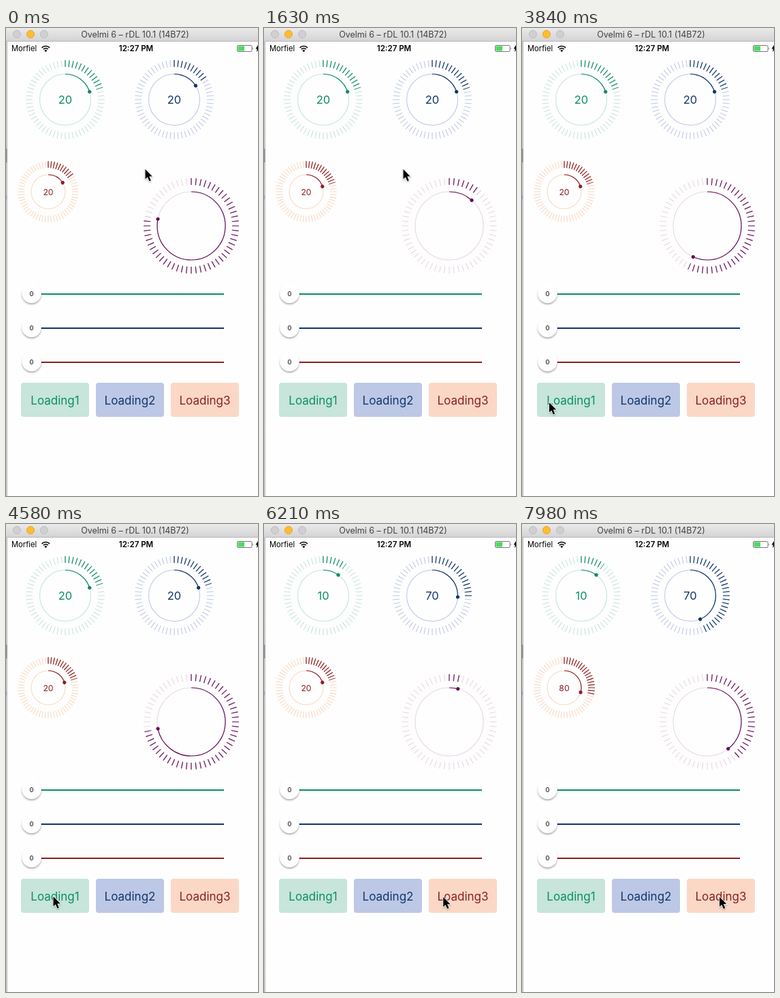
Write an HTML page that moves like this. It is 370 px wide and 686 px high and loops after 8000 ms.

```html
<!DOCTYPE html>
<html lang="en">
<head>
<meta charset="utf-8">
<title>Circular progress</title>
<style>
  html, body { margin: 0; width: 100%; height: 100%; overflow: hidden; background: #fff; }
  svg { display: block; width: 370px; height: 686px; font-family: Inter, Roboto, sans-serif; }
  text { text-anchor: middle; }
  .knob { fill: #fff; filter: drop-shadow(0 2.6px 1.2px rgba(0, 0, 0, .3)); }
</style>
</head>
<body>
<svg id="stage" viewBox="0 0 370 686">
  <defs>
    <linearGradient id="bar" x2="0" y2="1">
      <stop stop-color="#ebeaeb"/><stop offset="1" stop-color="#d3d2d4"/>
    </linearGradient>
    <linearGradient id="edge">
      <stop stop-color="#dedede"/><stop offset="1" stop-color="#a9a9a9"/>
    </linearGradient>
  </defs>
  <rect width="370" height="686" fill="#fefefe"/>
  <rect y="19" width="2" height="667" fill="url(#edge)"/>
  <rect y="177" width="2" height="20" fill="#98989c"/>
  <rect y="245" width="1.5" height="6" fill="#a3aee0"/>
  <rect width="370" height="19.5" fill="url(#bar)"/>
  <rect y="19" width="370" height="1" fill="#b9b8ba"/>
  <g fill="#d0cfd1" stroke="#bdbcbe">
    <circle cx="16" cy="9" r="5.5"/>
    <circle cx="36" cy="9" r="5.5" fill="#fdbd2f" stroke="#e5a52b"/>
    <circle cx="56" cy="9" r="5.5"/>
  </g>
  <text x="189.5" y="14" font-size="12.5" fill="#414141">Ovelmi 6 – rDL 10.1 (14B72)</text>

  <text x="8" y="34" font-size="11.2" style="text-anchor:start">Morfiel</text>
  <g fill="none" stroke="#000" stroke-width="1.7">
    <path d="M52.6 28.8a8.2 8.2 0 0 1 11.4 0M54.8 31.2a5 5 0 0 1 7 0"/>
    <path d="M58.3 35.2l-2-2.2a3 3 0 0 1 4 0z" fill="#000" stroke="none"/>
  </g>
  <text x="191" y="34" font-size="11.5" font-weight="600">12:27 PM</text>
  <rect x="339.5" y="25.5" width="21.5" height="9" rx="1.5" fill="#fff" stroke="#555" stroke-width=".8"/>
  <rect x="340.5" y="26.5" width="9.5" height="7" fill="#4cd964"/>
  <path d="M362 28.3q1.6 1.7 0 3.4z" fill="#555"/>
  <path d="M370 25l-3.5 5.6h2.2L368 35l2-2.5z"/>

  <g id="dials"></g>
  <g id="controls"></g>
  <path id="cursor" d="M0 0V14.6L3.3 11.5 5.9 17.4 8.3 16.4 5.8 10.6H10.3Z"
        stroke="#fff" stroke-width="1.6" paint-order="stroke"
        style="filter:drop-shadow(0 1px 1px rgba(0,0,0,.3))"/>
</svg>
<script>
const LOOP = 8000, STEP = 147.7;
const GREEN = '#0b8d65', BLUE = '#12356a', RED = '#8d1e24';
const PALE = { [GREEN]: '#c7e5da', [BLUE]: '#bdc8e6', [RED]: '#fbd8c5' };
const byId = id => document.getElementById(id);

// Each track is a list of [ms, degrees]; labels switch at a single moment.
const dials = [
  { x: 87, y: 105, r: 37.5, outer: 58, dark: GREEN, pale: PALE[GREEN], size: 16.5,
    track: [[0, 72], [4640, 72], [5640, 36]], label: [20, 10, 4700] },
  { x: 247, y: 105, r: 37.5, outer: 58, dark: BLUE, pale: PALE[BLUE], size: 16.5,
    track: [[0, 57], [420, 72], [5620, 72], [7980, 157.2]], label: [20, 70, 5750] },
  { x: 62, y: 240, r: 25, outer: 45, dark: RED, pale: PALE[RED], size: 12.3,
    track: [[0, 58], [390, 72], [7040, 72], [7980, 105.8]], label: [20, 80, 7080] },
  { x: 272, y: 290, r: 50, outer: 70, dark: '#660f56', pale: '#e8d7e4',
    track: [[0, 281.5], [1630, 401.7], [3100, 510.3], [4580, 618.5],
            [5620, 694], [6800, 776.6], [7980, 862.4]] },
];

const cursorTrack = [
  [3100, 204.5, 207], [3250, 190, 238], [3400, 150, 332], [3540, 105, 440],
  [3840, 40, 549], [4130, 58, 549], [4430, 69.5, 546], [4800, 69.5, 546],
  [5250, 189.5, 547], [5800, 189.5, 547], [6350, 290, 546.5],
];

function sample(track, t, col = 1) {
  const i = track.findIndex(p => p[0] > t);
  if (i === 0) return track[0][col];
  if (i < 0) return track[track.length - 1][col];
  const a = track[i - 1], b = track[i];
  return a[col] + (b[col] - a[col]) * (t - a[0]) / (b[0] - a[0]);
}

function tickPath(outer) {
  let d = '';
  for (let i = 0; i < 60; i++) {
    const a = i * Math.PI / 30, s = Math.sin(a), c = -Math.cos(a), inner = outer - 10;
    d += `M${(inner * s).toFixed(2)} ${(inner * c).toFixed(2)}L${(outer * s).toFixed(2)} ${(outer * c).toFixed(2)}`;
  }
  return d;
}

byId('dials').innerHTML = dials.map((d, i) => {
  const ticks = tickPath(d.outer);
  return `<g id="dial${i}" transform="translate(${d.x} ${d.y})" fill="none">
    <mask id="sweep${i}" maskUnits="userSpaceOnUse" x="-80" y="-80" width="160" height="160">
      <circle class="arc" r="${d.outer - 5}" pathLength="360" stroke="#fff" stroke-width="13" transform="rotate(-91.5)"/>
    </mask>
    <path d="${ticks}" stroke="${d.pale}" stroke-width="1.1"/>
    <path d="${ticks}" stroke="${d.dark}" stroke-width="1.2" mask="url(#sweep${i})"/>
    <circle r="${d.r}" stroke="${d.pale}" stroke-width="1.1"/>
    <circle class="arc" r="${d.r}" pathLength="360" stroke="${d.dark}" stroke-width="1.2" transform="rotate(-90)"/>
    <circle class="dot" cy="${-d.r}" r="2.6" fill="${d.dark}"/>
    ${d.label ? `<text y="${d.size * .365}" font-size="${d.size}" fill="${d.dark}"></text>` : ''}
  </g>`;
}).join('');

dials.forEach((d, i) => {
  const g = byId('dial' + i);
  d.arcs = g.querySelectorAll('.arc');
  d.dot = g.querySelector('.dot');
  d.text = g.querySelector('text');
});

byId('controls').innerHTML = [GREEN, BLUE, RED].map((color, i) => {
  const y = 390 + i * 50, x = 22 + i * 110;
  return `<path d="M37 ${y}H320" stroke="${color}" stroke-width="2"/>
    <circle class="knob" cx="37.5" cy="${y - 1}" r="14.3"/>
    <text x="37.5" y="${y + 3}" font-size="9.5">0</text>
    <rect x="${x}" y="520" width="100" height="50" rx="4" fill="${PALE[color]}"/>
    <text x="${x + 50}" y="551.5" font-size="17" fill="${color}">Loading${i + 1}</text>`;
}).join('');

function draw(t) {
  for (const d of dials) {
    const angle = sample(d.track, t) % 360;
    d.arcs[0].setAttribute('stroke-dasharray', `${angle + 1.5} 400`);
    d.arcs[1].setAttribute('stroke-dasharray', `${angle} 400`);
    d.dot.setAttribute('transform', `rotate(${angle})`);
    if (d.text) {
      const [before, after, at] = d.label;
      d.text.textContent = t < at ? before : after;
    }
  }
  byId('cursor').setAttribute('transform',
    `translate(${sample(cursorTrack, t)} ${sample(cursorTrack, t, 2)})`);
}

const start = performance.now();
function frame() {
  const t = (performance.now() - start) % LOOP;
  draw(Math.floor((t + 8) / STEP) * STEP);
  requestAnimationFrame(frame);
}
frame();
</script>
</body>
</html>
```
